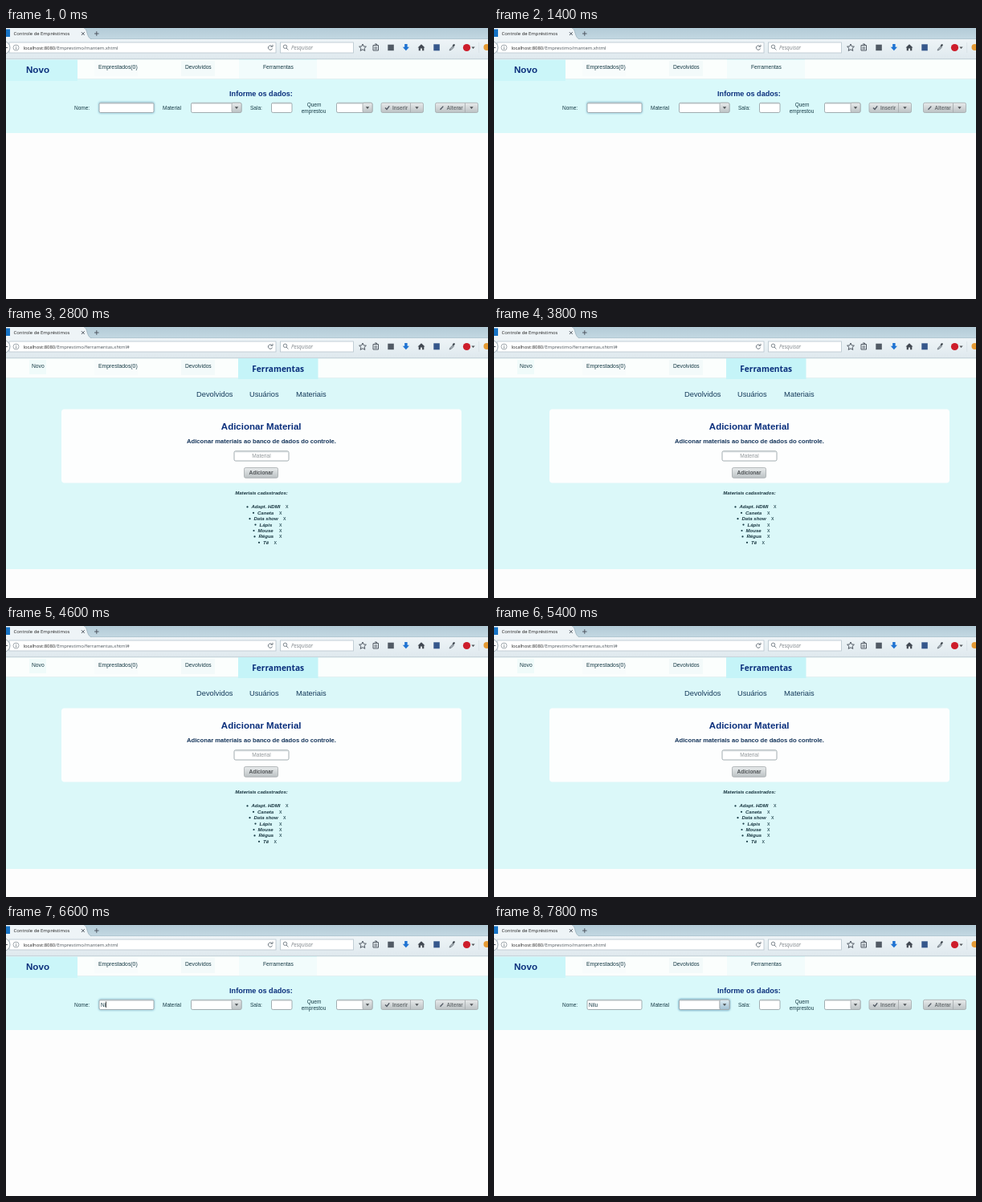
An HTML page for the animation above (8 s loop, 600 by 338 pixels).

```html
<!DOCTYPE html>
<html lang="pt-BR">
<head>
<meta charset="utf-8">
<title>Controle de Empréstimos</title>
<style>
  html, body { margin: 0; width: 100%; height: 100%; overflow: hidden; background: #fdfdfd; }
  svg { display: block; width: 100vw; height: 100vh; font: 6.7px "Liberation Sans", Arial, sans-serif; fill: #173b46; }
  .ui { font: 5.9px "Open Sans", sans-serif; fill: #222; }
  .bold { font-weight: bold; }
  .mid { text-anchor: middle; }
  .navy { fill: #0a2f7c; }
  .line { fill: none; stroke: #505862; stroke-width: 1; }
  .sub { font-size: 9.3px; fill: #14395a; }
  .list { font: italic bold 6.05px "Liberation Sans", Arial, sans-serif; fill: #17343f; }
</style>
</head>
<body>
<svg id="stage" viewBox="0 0 600 338" preserveAspectRatio="none">
  <defs>
    <linearGradient id="strip" x2="0" y2="1"><stop stop-color="#b3cbd7"/><stop offset="1" stop-color="#c3d8e2"/></linearGradient>
    <linearGradient id="bar" x2="0" y2="1"><stop stop-color="#eef4f7"/><stop offset="1" stop-color="#dfe9ee"/></linearGradient>
    <linearGradient id="gray" x2="0" y2="1"><stop stop-color="#e8ebec"/><stop offset="1" stop-color="#bcc2c4"/></linearGradient>
    <linearGradient id="blue" x2="0" y2="1"><stop stop-color="#e0edf4"/><stop offset="1" stop-color="#9fc0d3"/></linearGradient>
    <filter id="soft" x="-20%" y="-50%" width="140%" height="200%"><feGaussianBlur stdDeviation=".8"/></filter>
  </defs>
</svg>
<script>
const LOOP = 8000, STEP = 200;
const OPEN_TOOLS = 2800, BACK = 5600, CONNECT = 2400, NEXT_FIELD = 7400;
const TYPED = "Nilu", FIRST_KEY = 6400;

const rect = (x, y, w, h, fill, extra = "") =>
  `<rect x="${x}" y="${y}" width="${w}" height="${h}" fill="${fill}" ${extra}/>`;
const text = (x, y, s, cls = "", extra = "") => `<text x="${x}" y="${y}" class="${cls}" ${extra}>${s}</text>`;
const path = (d, extra = 'class="line"') => `<path d="${d}" ${extra}/>`;
const group = (id, content) => `<g id="${id}">${content}</g>`;
const arrow = (x, y) => path(`M${x - 2.2} ${y - 1}h4.4l-2.2 2.6z`, 'fill="#4c5154"');
const glow = (id, x, w, strength) => group(id, rect(x, 93, w, 12.8, "none",
  `rx="2" stroke="#5d9dbd" stroke-width="1.8" filter="url(#soft)" opacity="${strength}"`));
const box = (x, w, y = 93.3, h = 12.2) =>
  rect(x, y, w, h, "#fff", 'rx="1.8" stroke="#98a3a7" stroke-width=".9"') +
  path(`M${x + 1} ${y + 1}h${w - 2}`, 'stroke="#cdd4d6"');
const button = (x, w, y = 93.3, h = 12.2, fill = "url(#gray)") =>
  rect(x, y, w, h, fill, 'rx="1.8" stroke="#a4a9ab" stroke-width=".8"');
const select = (x, w) => box(x, w) + button(x + w - 12, 12) + arrow(x + w - 6, 99.3);
const split = (x, w, label, icon) => button(x, w) +
  path(`M${x + w - 16} 93.5v12`, 'stroke="#a4a9ab" stroke-width=".8"') +
  path(icon, 'class="line" style="stroke-width:1.4"') +
  text(x + 14, 101.5, label, "bold", 'font-size="6.3" style="fill:#6a7073"') + arrow(x + w - 8, 99.3);

const chrome = rect(0, 0, 600, 14, "url(#strip)") +
  path("M0 0H97C102 1 100 13 107 14H0z", 'fill="#eef4f7"') +
  path("M97 0C102 1 100 13 107 14H600", 'fill="none" stroke="#93a9b5" stroke-width=".7"') +
  rect(0, 14, 600, 24.5, "url(#bar)") + rect(0, 38, 600, 1, "#c7d3da") +
  group("favicon", rect(0, 1.5, 5, 9.5, "#1673c5")) +
  group("spinner", path("M4.6 3.2A4 4 0 1 1 -1 8.8", 'fill="none" stroke="#2586cb" stroke-width="1.4"')) +
  text(9.5, 9.3, "", "ui", 'id="title"') +
  path("M93.9 5.2l3.8 3.8m0-3.8l-3.8 3.8") + path("M110 7h5.6m-2.8-2.8v5.6") +
  rect(4, 18, 332, 13, "#fff", 'stroke="#b6c4cd" stroke-width=".8"') +
  rect(341.5, 18, 91, 13, "#fff", 'stroke="#b6c4cd" stroke-width=".8"') +
  `<circle cx="-3" cy="24.5" r="8" fill="#fafcfd" stroke="#9baab4"/>` +
  path("M-1 24.5h3") +
  `<circle cx="12.5" cy="24.5" r="3.5" class="line" style="stroke:#8b949b;stroke-width:.8"/>` +
  path("M12.5 22.4v1m0 .8v2.5", 'stroke="#7b858c" stroke-width=".9"') +
  `<text x="21.5" y="26.8" class="ui">localhost:8080<tspan id="path" fill="#4c555b"></tspan></text>` +
  group("reload", path("M331 22.7a2.7 2.7 0 1 0 .6 2.8M332 20.8v2.5h-2.5", 'class="line" style="stroke:#727c84"')) +
  group("stop", path("M327.2 22.5l4 4m0-4l-4 4", 'class="line" style="stroke:#727c84"')) +
  `<circle cx="347.5" cy="23.3" r="2.2" class="line" style="stroke:#7b858c"/>` +
  path("M349 25l2.3 2.5", 'class="line" style="stroke:#7b858c"') +
  text(355, 26.8, "Pesquisar", "ui", 'style="fill:#7d8489;font-size:6.3px;font-style:italic"') +
  path("M444 20l1.3 2.9 3.1.3-2.3 2.1.7 3.1-2.8-1.6-2.8 1.6.7-3.1-2.3-2.1 3.1-.3z") +
  path("M457 21.5h6.5v6.5H457zM459 20h2.5v1.5M458.5 24h3.5m-3.5 2h3.5") +
  rect(475.3, 20.7, 7.5, 7.5, "#515a64") +
  path("M496.2 20h3.4v3.7h2.4l-4.1 4.6-4.1-4.6h2.4z", 'fill="#1d72d2"') +
  path("M512.5 24.5l4.5-4.2 4.5 4.2h-1.2v3.8h-2.2v-2.7h-2.2v2.7h-2.2v-3.8z", 'fill="#434a53"') +
  rect(532.3, 20.3, 7.5, 8, "#35578c") +
  path("M552 28l1-2.2 3-3 1.4 1.4-3 3z", 'fill="#aab2b8" stroke="#59636d" stroke-width=".7"') +
  path("M555.5 22l1.5-1.7q2-.8 1.8 1.5l-1.5 1.8z", 'fill="#414951"') +
  `<circle cx="573.5" cy="24.5" r="4.6" fill="#cd1d2b"/>` + arrow(581.5, 24.4) +
  `<circle cx="598.5" cy="24" r="4" fill="#e59b35"/>` +
  rect(588.5, 18, .6, 13, "#d2dbe1");

const nav = rect(0, 39, 600, 25, "#fbfefd") + rect(0, 63, 600, 1, "#e3f1f2") +
  rect(0, 39, 600, 1, "#eaf5f5") +
  `<rect id="navTint" x="91" y="40" width="199" height="22" fill="#e4f9fa"/>` +
  rect(110, 41, 54, 19, "#f6fbfb", 'opacity=".5"') + rect(218, 41, 42, 19, "#effafa", 'opacity=".7"') +
  text(115, 51.2, "Emprestados(0)", "", 'font-size="6.85"') + text(223, 51.2, "Devolvidos");

const formPage = `<rect id="band" y="64" width="600" fill="#d9f9fa"/>` +
  rect(0, 39.5, 89, 26.5, "#cbf6f9") +
  `<rect id="toolsTab" x="290" y="39" width="97" height="24"/>` + rect(290, 39, 97, 1, "#d8f4f5") +
  text(39.5, 55.7, "Novo", "bold mid navy", 'font-size="11.6"') +
  text(320, 51.2, "Ferramentas") +
  text(317.5, 85, "Informe os dados:", "bold mid navy", 'font-size="9.1"') +
  text(85, 101.5, "Nome:", "", 'font-size="6.5"') + text(195, 101.5, "Material", "", 'font-size="6.5"') +
  text(304, 101.5, "Sala:", "", 'font-size="6.5"') +
  text(383.5, 97.7, "Quem", "mid", 'font-size="6.5"') + text(383, 105.5, "emprestou", "mid", 'font-size="6.5"') +
  glow("nameGlow", 116, 68, .55) + box(116, 68) +
  text(118, 101.5, "", "", 'id="typed" font-size="6.5"') +
  `<rect id="caret" y="95.5" width=".8" height="7.5" fill="#222"/>` +
  glow("materialGlow", 230.5, 62.5, .9) + select(230.5, 62.5) +
  group("materialButton", button(281, 12, 93.3, 12.2, "url(#blue)") + arrow(287, 99.3)) +
  box(330.5, 25.5) + select(411.5, 44.5) +
  split(467, 52.5, "Inserir", "M472 99.5l2 2 3.2-4.2") +
  split(534.5, 53, "Alterar", "M540.5 101.8l3.8-4.2");

const materials = [
  ["Adapt. HDMI", 305.5, 348], ["Caneta", 313, 340], ["Data show", 308.5, 345], ["Lápis", 315.5, 340],
  ["Mouse", 313.5, 340], ["Régua", 314.5, 340], ["Tê", 320, 333.5]
];
const toolsPage = `<rect id="toolsBand" y="64" width="600" fill="#dbf8f9"/>` +
  rect(29, 41, 21, 18, "#f0fbfa") + rect(289, 39, 99.5, 26, "#c5f4f8") +
  text(32, 51.2, "Novo") +
  text(338.7, 55.5, "Ferramentas", "mid navy bold", 'style="font-family:\'Open Sans\',sans-serif;font-size:10.15px"') +
  text(237, 86.5, "Devolvidos", "sub") + text(303, 86.5, "Usuários", "sub") + text(361, 86.5, "Materiais", "sub") +
  rect(69, 102.5, 498, 92, "#fdfefe", 'rx="4"') +
  text(317.7, 127.5, "Adicionar Material", "mid bold navy", 'font-size="11.5"') +
  text(318, 145.3, "Adiconar materiais ao banco de dados do controle.", "mid bold", 'font-size="7.65" style="fill:#14345a"') +
  box(284, 68, 154.8, 12.2) +
  text(318, 163, "Material", "mid", 'font-size="6.6" style="fill:#92989b"') +
  button(296.5, 42, 175.5, 12.7) +
  text(317.5, 184, "Adicionar", "mid bold", 'font-size="6.5" style="fill:#505457"') +
  text(318, 208.7, "Materiais cadastrados:", "list mid") +
  materials.map(([name, x, removeX], i) => {
    const y = 226.4 + i * 7.4;
    return `<circle cx="${x - 5}" cy="${y - 2}" r="1.1"/>` + text(x, y, name, "list") +
      text(removeX, y, "x", "", 'font-size="7"');
  }).join("");

document.getElementById("stage").insertAdjacentHTML("beforeend",
  rect(0, 0, 600, 338, "#fdfdfd") + chrome + nav + group("formPage", formPage) + group("toolsPage", toolsPage));

const get = id => document.getElementById(id);
const show = (id, on) => get(id).style.display = on ? "" : "none";
const set = (id, name, value) => get(id).setAttribute(name, value);

function render(now) {
  const t = Math.floor(now % LOOP / STEP) * STEP;
  const tools = t >= OPEN_TOOLS && t < BACK;
  const connecting = t >= CONNECT && t < OPEN_TOOLS;
  const returned = t >= BACK;
  const justBack = returned && t < 6200;
  const nameFocus = t < CONNECT || returned && t < NEXT_FIELD;
  const materialFocus = t >= NEXT_FIELD;
  const count = Math.max(0, Math.min(TYPED.length, (t - FIRST_KEY) / STEP + 1));
  const blinkOn = (t - (count ? FIRST_KEY + (count - 1) * STEP : BACK)) % 1000 < 500;

  show("formPage", !tools);
  show("toolsPage", tools);
  show("favicon", !connecting);
  show("spinner", connecting);
  show("reload", !connecting);
  show("stop", connecting);
  set("spinner", "transform", `rotate(${(t - 2600) * .36} 1.8 6)`);
  get("title").textContent = connecting ? "Conectando..." : "Controle de Empréstimos";
  get("path").textContent = "/Emprestimo/" +
    (tools ? "ferramentas.xhtml#" : connecting ? "ferramentas.xhtml" : "mantem.xhtml");

  show("navTint", justBack);
  set("band", "height", justBack ? 69.5 : 67);
  set("toolsBand", "height", t < 4400 ? 238 : 239);
  set("toolsTab", "fill", justBack ? "#dcf8fa" : "#f2fcfc");
  show("nameGlow", nameFocus);
  show("materialGlow", materialFocus);
  show("materialButton", materialFocus);
  get("typed").textContent = TYPED.slice(0, count);
  show("caret", returned && nameFocus && blinkOn);
  set("caret", "x", 118 + (count ? get("typed").getComputedTextLength() : 0));
}

const start = performance.now();
function tick() {
  render(performance.now() - start);
  requestAnimationFrame(tick);
}
tick();
</script>
</body>
</html>
```
